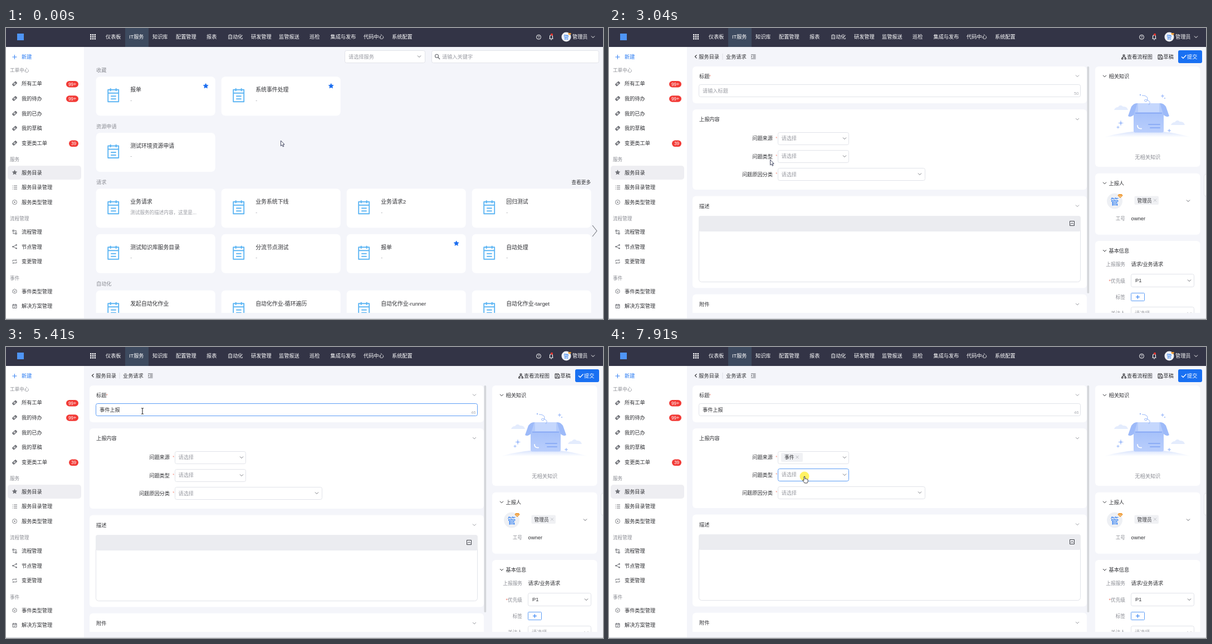
Write an HTML page that moves like this. It is 1072 px wide and 522 px high and loops after 7990 ms.

```html
<!DOCTYPE html>
<html lang="zh-CN">
<head>
<meta charset="utf-8">
<title>IT服务</title>
<style>
html, body { margin: 0; width: 100%; height: 100%; overflow: hidden; background: #f4f5fa; }
svg { display: block; width: 1072px; height: 522px; }
text { font-family: "Liberation Sans", "Noto Sans CJK SC", "Noto Sans CJK", sans-serif; white-space: pre; }
</style>
</head>
<body>
<svg id="stage" viewBox="0 0 1072 522" xmlns="http://www.w3.org/2000/svg"></svg>
<script>
const LOOP = 7990;
const BLUE = '#2478f2', FOCUS = '#5c9df6', INK = '#303135', GRAY = '#8b8d94', HINT = '#9a9ca3', EDGE = '#e1e3e9', STAR = '#f07a6a';

// Drawing helpers; text is placed by its vertical centre.
const text = (x, cy, s, fill = INK, size = 9.2, more = '') =>
  `<text x="${x}" y="${(cy + size * 0.37).toFixed(2)}" font-size="${size}" fill="${fill}" ${more}>${s}</text>`;
const endText = (x, cy, s, fill, size) => text(x, cy, s, fill, size, 'text-anchor="end"');
const midText = (x, cy, s, fill, size) => text(x, cy, s, fill, size, 'text-anchor="middle"');
const rect = (x, y, w, h, fill, r = 0, more = '') =>
  `<rect x="${x}" y="${y}" width="${w}" height="${h}" rx="${r}" fill="${fill}" ${more}/>`;
const line = (d, stroke, w = 1, more = '') =>
  `<path d="${d}" fill="none" stroke="${stroke}" stroke-width="${w}" ${more}/>`;
const dot = (x, y, r, fill, more = '') => `<circle cx="${x}" cy="${y}" r="${r}" fill="${fill}" ${more}/>`;
const group = (id, body, more = '') => `<g id="${id}" ${more}>${body}</g>`;
const at = (x, y, body) => `<g transform="translate(${x} ${y})">${body}</g>`;
const chevron = (x, y, color = '#777980', id = '') =>
  at(x, y, line('M-3 -1.5L0 1.5L3 -1.5', color, 1, id && `id="${id}"`));
const field = (x, y, w, h, id = '') =>
  rect(x + .5, y + .5, w - 1, h - 1, '#fff', 3, `stroke="${EDGE}" ${id && `id="${id}"`}`);
const card = (x, y, w, h, id = '') => rect(x, y, w, h, '#fff', 6, id && `id="${id}"`);
const starPath = r => {
  let d = '';
  for (let i = 0; i < 10; i++) {
    const a = i * Math.PI / 5, q = i % 2 ? r * .5 : r;
    d += (i ? 'L' : 'M') + (q * Math.sin(a)).toFixed(2) + ' ' + (-q * Math.cos(a)).toFixed(2);
  }
  return d + 'Z';
};
const star = (x, y, r, fill) => at(x, y, `<path d="${starPath(r)}" fill="${fill}" stroke="${fill}" stroke-linejoin="round" stroke-width=".6"/>`);

function header() {
  let s = rect(0, 0, 1072, 34, '#333446') + rect(214, 0, 42, 34, '#3d4a5f') + rect(20, 10, 12, 12, '#4f95f5');
  for (let i = 0; i < 9; i++) s += rect(151 + i % 3 * 3.8, 11 + Math.floor(i / 3) * 3.6, 2.5, 2.4, '#fff');
  const xs = [179, 221, 263, 305, 360, 398, 440, 490, 545, 582.5, 642, 693];
  '仪表板 IT服务 知识库 配置管理 报表 自动化 研发管理 监管报送 巡检 集成与发布 代码中心 系统配置'
    .split(' ').forEach((name, i) => s += text(xs[i], 16, name, '#fff'));
  s += dot(956.5, 16.3, 4, 'none', 'stroke="#fff"') + midText(956.5, 16.5, '?', '#fff', 7);
  s += line('M975.5 19.2H982.5M976.5 19V15.5A2.5 2.8 0 0 1 981.5 15.5V19M978 21H980', '#fff', 1.1) + dot(980, 11.7, 2, '#f5352f');
  s += dot(1006, 16, 8.5, '#eef0f5') + midText(1006, 16.2, '管', BLUE, 9) + at(1012, 10.5, '<path d="M-2-1.5H2L3 0L0 2.5L-3 0Z" fill="#f0a03c"/>');
  return s + text(1017, 16, '管理员', '#fff') + chevron(1054, 16, '#fff');
}

const icons = {
  tag: `<g transform="rotate(-42)">${rect(-4.5, -2.5, 9, 5, '#717379', 1.4)}${rect(-1.7, -1.3, 3, 2.6, '#fff')}${rect(-.7, -.8, 1, 1.6, '#717379')}</g>`,
  star: `<path d="${starPath(5)}" fill="#717379"/>`,
  list: line('M-4-3H-3M-1.5-3H4.5M-4 0H-3M-1.5 0H4.5M-4 3H-3M-1.5 3H4.5', '#717379'),
  bolt: dot(0, 0, 4, 'none', 'stroke="#717379" stroke-width=".9"') + '<path d="M.8-2.5L-1.8.5H0L-.8 2.5L1.8-.5H0Z" fill="#717379"/>',
  flow: line('M-3.5-3.5H-1V-1H-3.5ZM1 1.2H3.5V3.7H1ZM.5-2.5H2.5V0M-2.5 .5V2.7H-.2', '#717379', 1.1),
  share: line('M3-3L-3 0L3 3', '#717379') + dot(3, -3, 1.3, '#717379') + dot(-3, 0, 1.3, '#717379') + dot(3, 3, 1.3, '#717379'),
  loop: line('M-3.5 0V-2.5H3.5M2-4L3.6-2.5L2-1M3.5 0V2.5H-3.5M-2 1L-3.6 2.5L-2 4', '#717379', .9),
  hex: line('M0-4L3.5-2V2L0 4L-3.5 2V-2ZM-1.8-1L0 .2L1.8-1M0 .2V2.2', '#717379', .9),
  cal: line('M-3.5-3H3.5V3.5H-3.5ZM-3.5-1.2H3.5M-2-4V-2.5M2-4V-2.5M-1.5 1L-.3 2.2L1.8 0', '#717379', 1)
};

function sidebar() {
  let s = rect(0, 34, 140, 488, '#fff') + rect(3, 247, 132, 25, '#eeeef2', 5);
  s += line('M11.5 52H19.5M15.5 48V56', BLUE, .9) + text(28, 52, '新建', BLUE);
  [[76, '工单中心'], [236, '服务'], [342, '流程管理'], [449, '事件']].forEach(([y, n]) => s += text(7, y, n, GRAY, 8.6));
  [[100, 'tag', '所有工单'], [126.5, 'tag', '我的待办'], [153.2, 'tag', '我的已办'], [180, 'tag', '我的草稿'],
   [206.5, 'tag', '变更类工单'], [259.3, 'star', '服务目录'], [286, 'list', '服务目录管理'], [312.5, 'bolt', '服务类型管理'],
   [366, 'flow', '流程管理'], [392.3, 'share', '节点管理'], [419, 'loop', '变更管理'], [472.3, 'hex', '事件类型管理'],
   [499, 'cal', '解决方案管理']].forEach(([y, icon, n]) => s += at(15.5, y, icons[icon]) + text(28, y, n));
  [[108, 101, '99+'], [108, 127.3, '99+'], [113, 207.6, '39']].forEach(([x, y, n]) =>
    s += rect(x, y - 6, 130 - x, 11.5, '#f23a36', 5.75) + midText((x + 130) / 2, y - .2, n, '#fff', 8.3));
  return s;
}

function service(col, y, name, note = '-', fav = false) {
  const x = 161.7 + col * 225;
  let s = rect(x, y, 214, 70, '#fff', 7);
  s += at(x + 31, y + 34, line('M-9.5-10.5H9.5V11H-9.5ZM-9.5-4.5H9.5M-4.5 1H5M-4.5 6H5', '#5fb6f3', 1.9, 'stroke-linejoin="round"') +
    line('M-5-13V-8M5-13V-8', '#5fb6f3', 2.2));
  s += text(x + 61.5, y + 23.5, name, INK, 9.9) + text(x + 61.5, y + 42.3, note, HINT, 8.6);
  return fav ? s + star(x + 197, y + 16.8, 4.7, '#1a6df0') : s;
}

function catalogue() {
  let s = field(608, 40, 145, 23) + text(615, 51.3, '请选择服务', HINT) + chevron(742, 51);
  s += field(764, 40, 301, 23) + dot(773.5, 50.2, 3, 'none', 'stroke="#66686e" stroke-width="1.1"') +
    line('M775.8 52.5L779 56', '#66686e', 1.2) + text(783, 51.3, '请输入关键字', HINT);
  [[75.5, '收藏'], [176.3, '资源申请'], [277, '请求'], [458.5, '自动化']].forEach(([y, n]) => s += text(162, y, n, GRAY));
  s += endText(1050, 277.3, '查看更多', INK, 8.6);
  s += service(0, 87.3, '报单', '-', true) + service(1, 87.3, '系统事件处理', '-', true) + service(0, 188, '测试环境资源申请');
  const rows = [[288.3, '业务请求 业务系统下线 业务请求2 回归测试'], [369.7, '测试知识库服务目录 分流节点测试 报单 自动处理'],
    [470.7, '发起自动化作业 自动化作业-循环遍历 自动化作业-runner 自动化作业-target']];
  rows.forEach(([y, names], r) => names.split(' ').forEach((n, c) =>
    s += service(c, y, n, !r && !c ? '测试服务的描述内容，这里是...' : '-', r === 1 && c === 2)));
  return s + line('M1053 354L1061 364L1053 374', '#7b7d84', 1.1);
}

const required = (y, name) => endText(294, y, name) + text(299.3, y - 1, '*', STAR, 7.5);
const select = (y, w, id, arrow = '') => field(303, y, w, 23, id) + chevron(303 + w - (w > 200 ? 10 : 8), y + 11, '#777980', arrow);

function form() {
  let top = line('M157.5 48.3L154.5 51.3L157.5 54.3', INK, 1.2) + text(161.3, 51.5, '服务目录') + line('M204 46V57', '#dcdee4') +
    text(210, 51.5, '业务请求') + line('M255 48H263.5M258.5 50.3H263.5M258.5 52.6H263.5M255 55H263.5M255 50L257 51.4L255 52.9', '#4d4f55', .9);
  top += line('M923 48H926V50H923ZM920.5 54H923V56H920.5ZM926 54H928.5V56H926ZM924.5 50V52M921.7 54V52H927.3V54', INK) + text(930, 51.7, '查看流程图') +
    line('M986 48H992L994 50V56H986ZM988 48V50.5H991.5V48M988 56V53H992V56', INK) + text(995.5, 51.7, '草稿') +
    rect(1022, 40, 43, 23, '#1970f2', 3) + line('M1028 51.5L1031 54.3L1036.5 48.5', '#fff', 1.3) + text(1038, 51.7, '提交', '#fff');

  const title = card(150, 69, 708, 66, 'titleCard') + text(162, 86.5, '标题') + text(180, 86, '*', STAR, 7.5) + chevron(841, 86, '#999ba1') +
    field(161, 101, 686, 23, 'titleBox') + text(168, 112.2, '请输入标题', HINT, 9.2, 'id="titleText"') +
    rect(168, 107, 1, 10, '#444', 0, 'id="caret"') + endText(843.5, 117, '<tspan id="count">50</tspan>', '#adafb5', 7.6) +
    group('error', text(162, 131, '请输入内容', '#f04a40', 8.6));

  const source = text(162, 164, '上报内容') + chevron(841, 163.5, '#999ba1') + required(198, '问题来源') + select(187, 128, 'sourceBox', 'sourceArrow') +
    group('sourceHint', text(309.5, 197.7, '请选择', HINT)) +
    group('sourceTag', rect(309, 190, 39, 16, '#f0f1f4', 2) + text(315, 198, '事件', INK, 8.7) + line('M335.5 195L340.5 200M340.5 195L335.5 200', '#a5a7ad', .8));
  const rest = required(230.2, '问题类型') + select(219, 128, 'typeBox') + text(309.5, 229.7, '请选择', HINT) +
    required(262.5, '问题原因分类') + select(251, 265, 'causeBox') + text(309.5, 262.3, '请选择', HINT) +
    card(150, 301.5, 708, 165) + text(162, 319.7, '描述') + chevron(841, 319, '#999ba1') +
    rect(161.5, 337.5, 685, 118, '#fff', 5, `stroke="${EDGE}"`) + rect(161, 337, 686, 28, '#ebecf0', 4) +
    line('M827.5 346.5H835.5V354.5H827.5ZM829 352L831.5 349.5L834 352', '#3f4147', 1) +
    card(150, 477.7, 708, 60) + text(162, 496, '附件') + chevron(841, 495.5, '#999ba1');

  const body = title + group('lower', card(150, 146, 708, 144, 'reportCard') + source + group('rest', rest)) +
    rect(858.5, 69, 3.7, 407, '#d4d6da', 1.8, 'id="thumb"');
  return top + group('formBody', body, 'clip-path="url(#page)"') + group('aside', aside(), 'clip-path="url(#page)"');
}

const cloud = (x, y) => at(x, y, '<path d="M-12 4Q-10-1-5-1Q-1-7 4-2Q11-3 13 4Z" fill="#e4ecfd"/>');
const spark = (x, y, r) => at(x, y, `<path d="M0-${r}Q0 0 ${r} 0Q0 0 0 ${r}Q0 0-${r} 0Q0 0 0-${r}Z" fill="#a3bffa" stroke="#a3bffa" stroke-width=".5"/>`);

function aside() {
  let s = card(873, 69, 188.5, 180) + card(873, 260.7, 188.5, 110) + card(873, 382, 188.5, 150);
  [[86.3, '相关知识'], [278.2, '上报人'], [399.5, '基本信息']].forEach(([y, n]) => s += chevron(890, y, INK) + text(897.5, y, n));
  s += '<path d="M888 196Q967 173 1046 196Z" fill="url(#ground)"/>' + cloud(919, 143) + cloud(1021, 170) +
    '<path d="M942 152L949 135H989L996 152Z" fill="#b3cafb"/><path d="M950 135H988V152H950Z" fill="#c5d7fd"/>' +
    rect(942, 151, 54, 36.5, 'url(#box)', 3) +
    '<path d="M949 135L942 156Q937 161 932 158L938 141Q943 134 949 135ZM989 135L996 156Q1001 161 1006 158L1000 141Q995 134 989 135Z" fill="#9dbaf9"/>' +
    line('M945 152.8H993', '#86a8f5', 1.6) + line('M969 173H989M972 179H989', '#8cadf6', 2, 'stroke-linecap="round"') +
    line('M949 175Q949 181 956 180.5', '#fff', 1.8, 'stroke-linecap="round"') +
    line('M969 138Q974 133 968 130Q960 126 962 131Q966 135 967 126Q966 121 957 121', '#8eb0f8', .9) + dot(954, 120, 1.1, '#7ba3f6') +
    spark(994, 122, 3) + spark(919, 170.5, 4.5) + spark(914, 178, 2.5) + spark(1006, 184, 3) + dot(998, 126, .9, '#8eb0f8') +
    midText(967.3, 231.3, '无相关知识', GRAY);
  s += dot(908, 310.5, 14, '#eef0f4') + midText(908, 311.3, '管', BLUE, 15) +
    at(918, 301, '<path d="M-2.7-3H2.7L4.7-.4L0 4L-4.7-.4Z" fill="#ee9b36"/>' + line('M-2-.6L0 1.4L2-.6', '#fff', .9)) +
    rect(943.5, 301.5, 43.5, 15.5, '#f0f1f4', 2) + text(948.5, 309.5, '管理员', INK, 8.7) +
    line('M978 306.5L983 311.5M983 306.5L978 311.5', '#b5b7bd', .8) + chevron(1040, 310, '#66686e') +
    endText(927, 341.8, '工号', GRAY, 8.7) + text(937.5, 341.5, 'owner', INK, 9.4);
  s += endText(927, 424, '上报服务', GRAY, 8.7) + text(937.5, 424, '请求/业务请求') +
    endText(927, 453.3, `<tspan fill="${STAR}">*</tspan>优先级`, GRAY, 8.7) + field(937, 441, 114, 24) + text(945, 453, 'P1', INK, 9.4) + chevron(1042, 453, '#66686e') +
    endText(927, 482.5, '标签', GRAY, 8.7) + rect(937.5, 475.5, 24, 14, '#fff', 1, `stroke="${FOCUS}"`) + line('M946 482.5H953M949.5 479V486', BLUE, 1) +
    endText(927, 512, '关注人', GRAY, 8.7) + field(937, 500, 114, 24) + text(944, 511.5, '请选择', HINT) + chevron(1042, 512, '#66686e');
  return s + rect(1068.5, 262, 8, 40, '#fafbfd', 4, 'stroke="#e5e7ec"');
}

function dropdown() {
  let s = rect(303.5, 213, 127.5, 108, '#fff', 3, 'filter="url(#shadow)"') + rect(304, 223.5, 123, 21.5, '#f4f8fd', 0, 'id="option"');
  ['事件', '变更/发布失败', '主动预防发现的问题', '事件趋势分析'].forEach((n, i) => s += text(315, 235 + i * 21.6, n));
  return s;
}

const pointer = group('arrow', '<path d="M0 0V9.6L2.2 7.6L3.8 11L5.3 10.3L3.8 7H6.6Z" fill="#fff" stroke="#2d3350" stroke-width=".9"/>') +
  group('beam', line('M-2-5.2H-.7Q0-5 0-4V4Q0 5-.7 5.2H-2M2-5.2H.7Q0-5 0-4M0 4Q0 5 .7 5.2H2', '#17181c', 1)) +
  group('hand', '<path d="M-1 6V.8Q0-.7 1 .8V4.6Q2 3.6 2.8 4.8Q3.9 4 4.5 5.2Q6 4.6 6.2 6.2V9Q6 10.5 5 12H.2Q-.8 10.3-3 7.8Q-3.3 6.2-1.8 6.6L-1 7.4Z" fill="#fff" stroke="#26272c" stroke-width=".9"/>');

document.getElementById('stage').innerHTML = `<defs>
  <clipPath id="page"><rect x="140" y="34" width="932" height="477"/></clipPath>
  <linearGradient id="box" x2="0" y2="1"><stop stop-color="#a6c1fa"/><stop offset="1" stop-color="#b9cefc"/></linearGradient>
  <linearGradient id="ground" x2="0" y2="1"><stop stop-color="#d4e0fc"/><stop offset="1" stop-color="#fff"/></linearGradient>
  <filter id="shadow" x="-10%" y="-10%" width="120%" height="120%"><feDropShadow dx="0" dy="1" stdDeviation="2" flood-color="#000" flood-opacity=".14"/></filter>
</defs>` + rect(0, 0, 1072, 522, '#f4f5fa') + header() + sidebar() +
  group('list', catalogue(), 'clip-path="url(#page)"') +
  group('loading', at(608, 271, line('M0-5.3A5.3 5.3 0 1 0 5.3 0', BLUE, 1.1, 'id="ring"')) + midText(608, 284.7, '加载中', BLUE)) +
  group('form', form()) + group('menu', dropdown()) + rect(0, 520.8, 1072, 1.2, '#d3d5da') +
  group('click', dot(0, 0, 8.5, '#fff04a', 'opacity=".85"')) + group('cursor', pointer);

const els = {};
document.querySelectorAll('[id]').forEach(e => els[e.id] = e);
const set = (id, name, value) => els[id].setAttribute(name, value);
const show = (id, on) => set(id, 'visibility', on ? 'inherit' : 'hidden');
const clamp = v => Math.max(0, Math.min(1, v));
const between = (t, a, b) => t >= a && t < b;

// Pointer moves: first step, last step, number of steps, goal.
const moves = [[710, 1480, 11, 297, 303], [3040, 3500, 7, 245, 123], [3730, 3730, 1, 245, 115],
  [5640, 6030, 6, 315, 188], [6430, 6590, 3, 338, 198], [6750, 6970, 4, 351, 232]];

function pointerAt(t) {
  let x = 493.5, y = 202;
  for (const [a, b, n, gx, gy] of moves) {
    if (t < a) break;
    const k = b > a ? Math.min(n, Math.floor((t - a) / (b - a) * (n - 1) + .01) + 1) / n : 1;
    x += (gx - x) * k;
    y += (gy - y) * (n === 7 ? 1 - (1 - k) ** 3 : k * k * (3 - 2 * k));
  }
  return [x, y];
}

function render(t) {
  const [x, y] = pointerAt(t);
  const shape = t >= 6750 ? 'hand' : t >= 3730 && (y < 123 || y > 186) ? 'beam' : 'arrow';
  ['arrow', 'beam', 'hand'].forEach(s => show(s, s === shape));
  set('cursor', 'transform', `translate(${x} ${y})`);
  set('click', 'transform', `translate(${x} ${y})`);
  show('click', between(t, 1560, 1640) || between(t, 3890, 3970) || between(t, 6510, 6590) || between(t, 7290, 7370) || t >= 7910);

  show('list', t < 1640);
  show('loading', between(t, 1640, 2420));
  show('form', t >= 2420);
  set('ring', 'transform', `rotate(${(t - 1720) * .36})`);

  const typed = t < 4430 ? '' : t < 4860 ? '事件' : '事件上报';
  els.titleText.textContent = typed || '请输入标题';
  set('titleText', 'fill', typed ? INK : HINT);
  els.count.textContent = 50 - typed.length;
  set('titleBox', 'stroke', between(t, 3730, 6590) ? FOCUS : EDGE);
  set('caret', 'x', 168 + typed.length * 9);
  const blinkFrom = t < 4430 ? 3970 : t < 4860 ? 4430 : 4860;
  show('caret', between(t, 3970, 6590) && Math.floor((t - blinkFrom) / 540) % 2 === 0);

  const invalid = between(t, 4430, 4700), picked = t >= 7370;
  const drop = invalid ? 15 : 0;
  set('error', 'opacity', invalid ? clamp(.18 + (4610 - t) / 360) : 0);
  set('titleCard', 'height', 66 + drop);
  set('lower', 'transform', `translate(0 ${drop})`);
  set('rest', 'transform', `translate(0 ${picked ? -1 : 0})`);
  set('reportCard', 'height', picked ? 143 : 144);
  set('thumb', 'height', invalid ? 395 : 407);

  const opened = between(t, 6590, 7370);
  show('thumb', !opened);
  show('sourceHint', !picked);
  show('sourceTag', picked);
  set('sourceBox', 'stroke', between(t, 6180, 6750) ? FOCUS : EDGE);
  set('typeBox', 'stroke', t >= 7910 ? FOCUS : EDGE);
  const open = clamp((t - 6590) / 200) * clamp((7570 - t) / 200);
  set('sourceArrow', 'transform', opened ? 'scale(1 -1)' : '');
  show('menu', open > 0);
  set('menu', 'opacity', open);
  set('menu', 'transform', `translate(0 ${213 * .2 * (1 - open)}) scale(1 ${.8 + .2 * open})`);
  show('option', open > 0 && y > 223);
}

const start = performance.now();
function tick() {
  render((performance.now() - start) % LOOP);
  requestAnimationFrame(tick);
}
tick();
</script>
</body>
</html>
```
